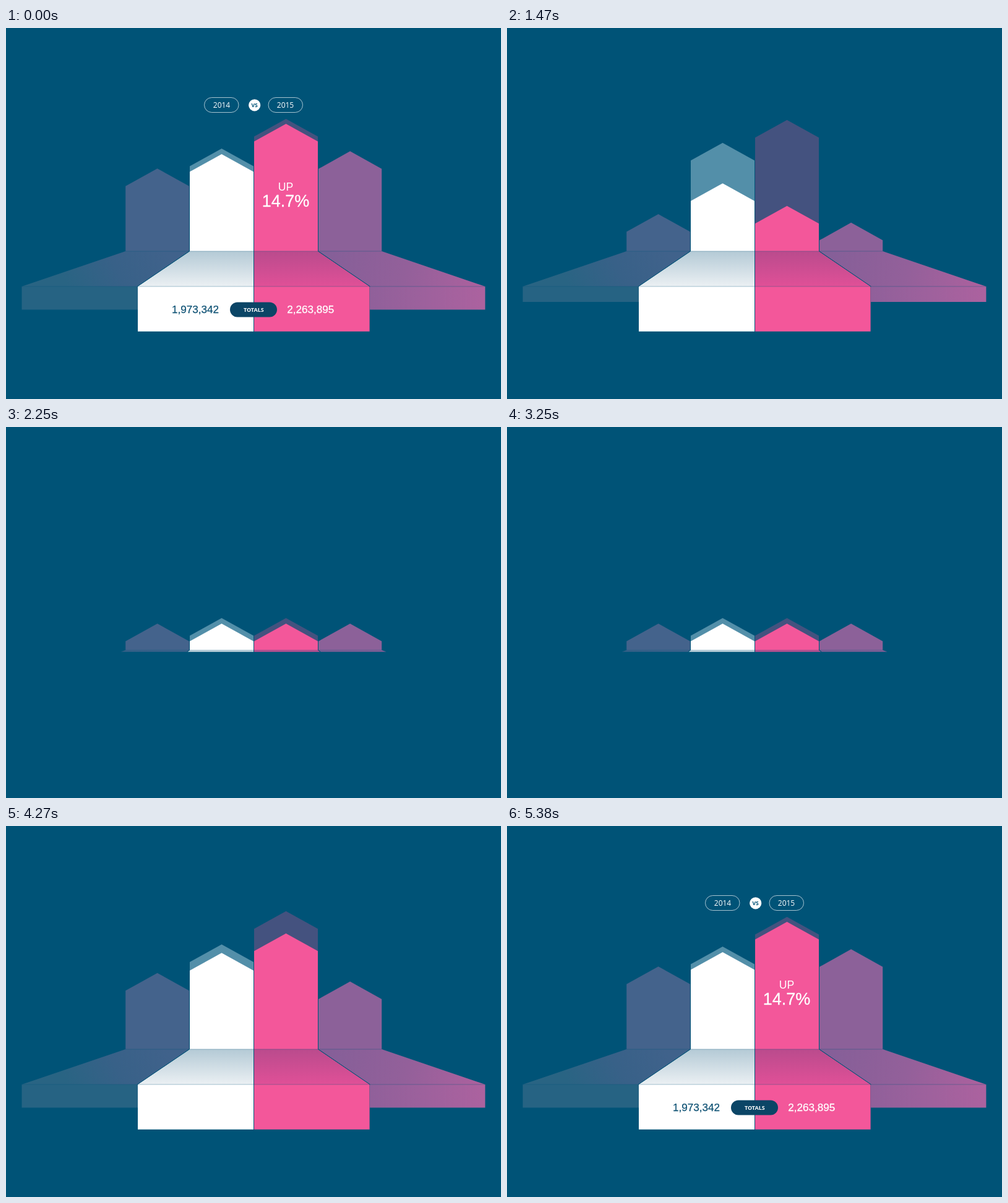
These frames come from a looping animation (800 px wide and 600 px high, 7.38 s). An HTML page:

```html
<!DOCTYPE html>
<html lang="en">
<head>
<meta charset="utf-8">
<title>2014 vs 2015</title>
<style>
  html, body { margin: 0; width: 100%; height: 100%; overflow: hidden; background: #005377; }
  svg { display: block; width: 100%; height: 100%; }
  text { text-anchor: middle; fill: #fff; font-family: "Liberation Sans", Arial, sans-serif; }
  .label { font-family: "Open Sans", "Noto Sans", sans-serif; }
  .bold { font-weight: 700; }
  .pill { fill: none; stroke: #fff; stroke-opacity: .65; }
</style>
</head>
<body>
<svg viewBox="0 0 800 600">
  <defs>
    <linearGradient id="whiteFloor" x2="0" y2="1">
      <stop stop-color="#b4cad6"/><stop offset="1" stop-color="#ebf0f3"/>
    </linearGradient>
    <linearGradient id="pinkFloor" x2="0" y2="1">
      <stop stop-color="#ba4b8d"/><stop offset="1" stop-color="#e05097"/>
    </linearGradient>
    <linearGradient id="leftFloor" gradientUnits="userSpaceOnUse" x1="260" y1="361" x2="110" y2="440">
      <stop stop-color="#40628b"/><stop offset=".5" stop-color="#386188"/><stop offset="1" stop-color="#296483"/>
    </linearGradient>
    <linearGradient id="rightFloor" gradientUnits="userSpaceOnUse" x1="520" y1="361" x2="774" y2="418">
      <stop stop-color="#855f98"/><stop offset=".5" stop-color="#93609a"/><stop offset="1" stop-color="#ad619e"/>
    </linearGradient>
    <linearGradient id="rightSlab" gradientUnits="userSpaceOnUse" x1="588" y1="0" x2="774" y2="0">
      <stop stop-color="#90609a"/><stop offset="1" stop-color="#ac629f"/>
    </linearGradient>
  </defs>
  <rect width="800" height="600" fill="#005377"/>
  <g id="shapes"></g>
  <g fill="none" stroke="#005377">
    <path id="seams" stroke-width="1"/>
    <path id="creases" stroke-opacity=".4" stroke-width=".9"/>
  </g>

  <g id="years">
    <rect class="pill" x="320.5" y="112.5" width="55.5" height="24" rx="12"/>
    <rect class="pill" x="424" y="112.5" width="55.5" height="24" rx="12"/>
    <text class="label" x="348.5" y="129.3" font-size="12">2014</text>
    <text class="label" x="451.5" y="129.3" font-size="12">2015</text>
    <circle cx="401.7" cy="124.8" r="9.6" fill="#fff"/>
    <text class="label bold" x="401.7" y="128" font-size="8.6" style="fill:#005377">VS</text>
  </g>
  <text id="up" x="452" y="262.5" font-size="17.6">UP</text>
  <text id="percent" x="452" y="288.5" font-size="27" stroke="#fff" stroke-width=".3">14.7%</text>
  <text id="before" x="306" y="461" font-size="17.1" stroke="#0b4f72" stroke-width=".25" style="fill:#0b4f72">1,973,342</text>
  <text id="after" x="492.3" y="461" font-size="17.1" stroke="#fff" stroke-width=".3">2,263,895</text>
  <g id="totals">
    <rect x="362" y="443.5" width="76" height="24" rx="12" fill="#0b4566"/>
    <text class="label bold" x="400.3" y="458.8" font-size="9">TOTALS</text>
  </g>
</svg>
<script>
const LOOP = 7380, LENGTH = 2250, RISE = 3250;
const BASE = 361, EDGE = 418, ROOF = 28.5;
const $ = id => document.getElementById(id);

const clamp = v => Math.min(1, Math.max(0, v));
const mix = (a, b, k) => a + (b - a) * k;
const inOut = u => u < .5 ? 4 * u ** 3 : 1 - 4 * (1 - u) ** 3;
const out = u => 1 - (1 - u) ** 2;
const back = u => 1 + 4 * (u - 1) ** 3 + 3 * (u - 1) ** 2;
const run = (t, start, length, ease) => ease(clamp((t - start) / length));

// x range, fill, resting and raised peak, start, duration, easing
const bars = [
  [193.2, 296, '#44638c', 318, 227.3, 521, 720, inOut],
  [505, 607.2, '#8c6199', 318, 199.3, 645, 720, inOut],
  [297, 400, '#538fa9', 309, 195, 664, 400, back],
  [401, 504, '#44527f', 309, 147, 682, 400, back],
  [297, 400, '#fff', 318, 204, 398, 720, inOut],
  [401, 504, '#f3579a', 318, 155, 521, 720, inOut]
];

// back edge, front edge, floor fill, slab fill, slab bottom, floor start, slab start
const wings = [
  [193.2, 296, 25.5, 213, 'url(#leftFloor)', '#266383', 455.5, 356, 656],
  [505, 607.2, 588, 774.4, 'url(#rightFloor)', 'url(#rightSlab)', 455.5, 356, 656],
  [297, 400, 213, 400, 'url(#whiteFloor)', '#fff', 490.7, 241, 541],
  [401, 504, 401, 587.6, 'url(#pinkFloor)', '#f3579a', 490.7, 241, 541]
];

function shape(fill) {
  const p = document.createElementNS('http://www.w3.org/2000/svg', 'path');
  p.setAttribute('fill', fill);
  return $('shapes').appendChild(p);
}
const barPaths = bars.map(b => shape(b[2]));
const wingPaths = wings.map(w => [shape(w[4]), shape(w[5])]);

function drawBar([x0, x1, , low, high, start, length, ease], path, t) {
  const y = mix(low, high, run(t, start, length, ease));
  path.setAttribute('d', `M${x0} ${BASE}V${y + ROOF}L${(x0 + x1) / 2} ${y}L${x1} ${y + ROOF}V${BASE}Z`);
}

const floorY = (t, start) => mix(363.5, EDGE, run(t, start, 300, inOut));

function drawWing([a0, a1, b0, b1, , , bottom, start, slabStart], [floor, slab], t) {
  const y = floorY(t, start), k = (y - BASE) / (EDGE - BASE);
  floor.setAttribute('d', `M${a0} ${BASE}H${a1}L${mix(a1, b1, k)} ${y}H${mix(a0, b0, k)}Z`);
  const h = mix(EDGE, bottom, run(t, slabStart, 220, inOut));
  slab.setAttribute('d', `M${b0} ${EDGE}H${b1}V${h}H${b0}Z`);
}

function drawLines(t) {
  const y = floorY(t, wings[2][7]), k = (y - BASE) / (EDGE - BASE);
  $('seams').setAttribute('d',
    `M296.4 ${BASE}L${mix(296.4, 212.2, k)} ${y}M504.6 ${BASE}L${mix(504.6, 588.4, k)} ${y}`);
  const edge = t > wings[2][8] ? `M213 ${EDGE}H588` : '';
  const sideEdge = t > wings[0][8] ? `M25.5 ${EDGE}H213M588 ${EDGE}H774.5` : '';
  $('creases').setAttribute('d', `M193 ${BASE}H607` + edge + sideEdge);
}

function reveal(id, t, start, dx, dy) {
  const k = run(t, start, 440, out);
  $(id).setAttribute('opacity', k);
  $(id).setAttribute('transform', `translate(${dx * (1 - k)} ${dy * (1 - k)})`);
}

function render(t) {
  bars.forEach((b, i) => drawBar(b, barPaths[i], t));
  wings.forEach((w, i) => drawWing(w, wingPaths[i], t));
  drawLines(t);
  reveal('years', t, 1060, 0, 0);
  reveal('before', t, 1130, -16, 0);
  reveal('after', t, 1130, 16, 0);
  reveal('up', t, 1180, 0, -30);
  reveal('percent', t, 1292, 0, 7);
  const k = run(t, 1130, 440, out);
  $('totals').setAttribute('opacity', k);
  $('totals').setAttribute('transform', `translate(400 455.5) scale(${mix(.5, 1, k)}) translate(-400 -455.5)`);
}

// The build plays backwards, rests, then plays forwards, in 30 ms steps.
function buildTime(ms) {
  const step = v => Math.floor(v / 30 + 1e-6) * 30;
  return ms < RISE ? Math.max(0, LENGTH - step(ms)) : Math.min(LENGTH, step(ms - RISE));
}

const origin = performance.now();
function tick() {
  render(buildTime((performance.now() - origin) % LOOP));
  requestAnimationFrame(tick);
}
tick();
</script>
</body>
</html>
```
